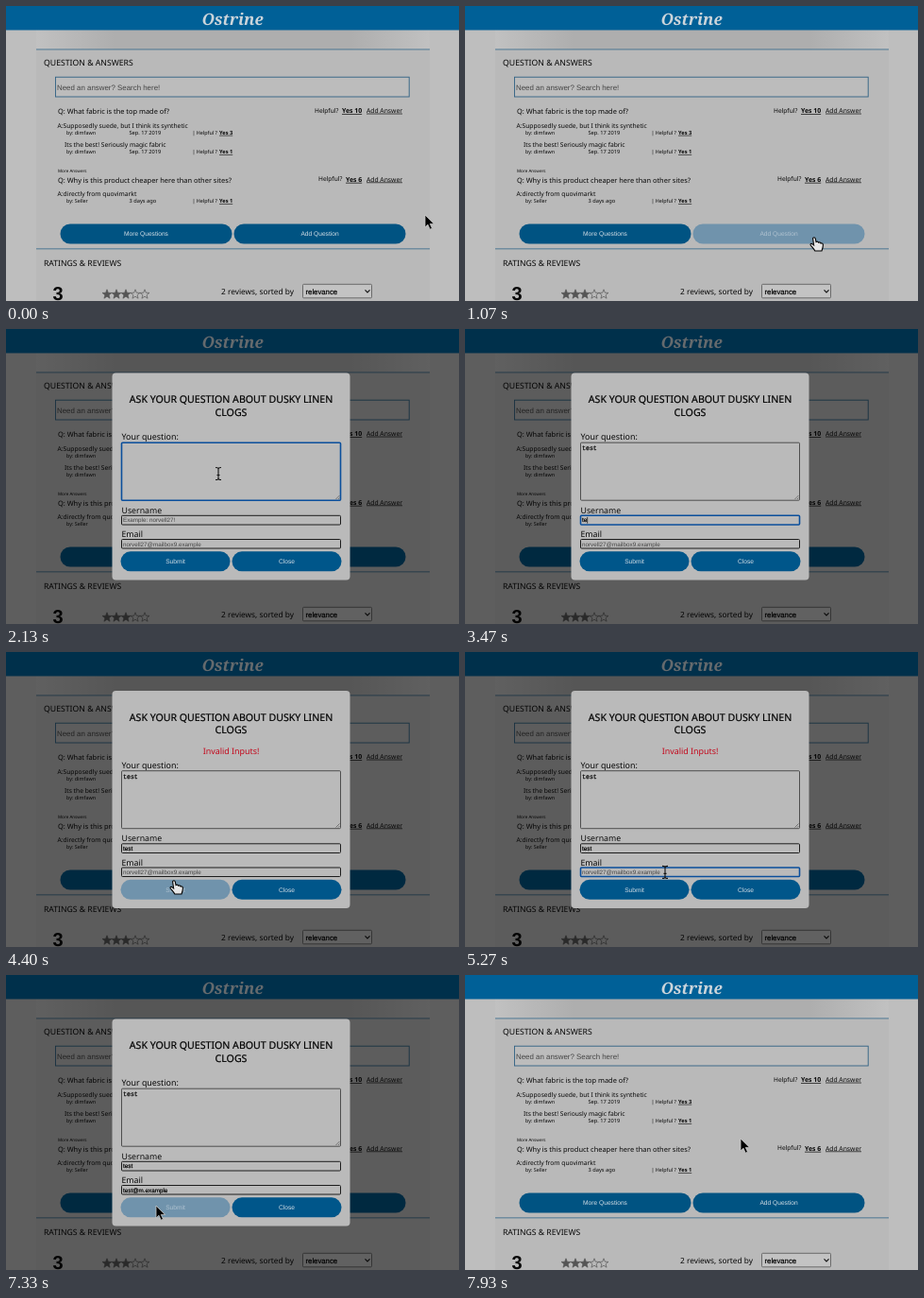
An HTML page for the animation above (8 s loop, 480 by 312 pixels).

```html
<!DOCTYPE html>
<html lang="en">
<head>
<meta charset="utf-8">
<title>Ask a question</title>
<style>
  html, body { margin: 0; width: 100%; height: 100%; overflow: hidden; background: #bebebe; }
  svg { display: block; width: 100vw; height: 100vh; }
  text { font-family: "Noto Sans", "Open Sans", sans-serif; text-rendering: geometricPrecision; fill: #080808; white-space: pre; }
  .ui { font-family: "Liberation Sans", Arial, sans-serif; }
  .mono { font-family: "Liberation Mono", monospace; }
  .logo { font: italic bold 17px "Noto Serif", serif; fill: #ccd5db; }
  .mid { text-anchor: middle; }
  .link { text-decoration: underline; }
  .yes { text-decoration: underline; font-weight: 600; }
  .dark { fill: #000; stroke: #000; stroke-width: .2; }
  .hint { fill: #444; stroke: none; }
  .error { fill: #c4061a; }
  .button rect { fill: #005382; }
  .button text { fill: #d2dde5; }
  #modal .button rect { fill: #00568a; }
  .button.hover rect { fill: #7093ac !important; }
  .button.hover text { fill: #afc2d0; }
  .field { fill: #bababa; stroke: #1c1c1c; }
  #questionBox { stroke: #333; stroke-width: .8; }
  .field.focus, #questionBox.focus { stroke: #0b4f9c; stroke-width: 1.6; }
</style>
</head>
<body>
<svg id="stage" viewBox="0 0 480 312" preserveAspectRatio="none"></svg>
<script>
const text = (x, y, size, str, cls = '', id = '') =>
  `<text x="${x}" y="${y}" font-size="${size}" class="${cls}" id="${id}">${str}</text>`;
const rect = (x, y, w, h, attrs) =>
  `<rect x="${x}" y="${y}" width="${w}" height="${h}" ${attrs}/>`;
const button = (id, x, y, w, label) =>
  `<g class="button" id="${id}">${rect(x, y, w, 21, 'rx="10.5"')}${text(x + w / 2, y + 12.8, 6.65, label, 'ui mid')}</g>`;
const field = (id, y, h) => rect(122.5, y, 232, h, `id="${id}" class="field" rx="1"`);

const question = (y, x, str, votes) =>
  text(55, y, 7.42, str) + text(x, y - 1.4, 6.6, 'Helpful?') +
  text(x + 29, y - 1, 6.9, `Yes ${votes}`, 'yes') + text(382, y - 1.3, 6.75, 'Add Answer', 'link');
const answer = (x, y, str, author, date, votes) =>
  text(x, y, 6.7, str) + text(64, y + 6.9, 5.4, `by: ${author}`) + text(130.5, y + 6.9, 5.7, date) +
  text(197.5, y + 7, 5.4, '| Helpful ?') + text(226, y + 7, 5.7, `Yes ${votes}`, 'yes');

const star = (cx, cy, filled) => {
  const points = Array.from({ length: 10 }, (_, i) => {
    const r = i % 2 ? 2.2 : 5.2, a = i * Math.PI / 5;
    return [cx + r * Math.sin(a), cy - r * Math.cos(a)].map(v => v.toFixed(2));
  });
  return `<polygon points="${points.join(' ')}" fill="${filled ? '#555' : 'none'}" stroke="#555" stroke-width=".7"/>`;
};

const page = `
  <linearGradient id="strip"><stop stop-color="#c1c1c1"/><stop offset=".2" stop-color="#aeaeae"/>
    <stop offset=".8" stop-color="#aeaeae"/><stop offset="1" stop-color="#c1c1c1"/></linearGradient>
  ${rect(0, 0, 480, 312, 'fill="#bebebe"')}
  ${rect(32, 25, 417, 287, 'fill="#b9b9b9"')}
  ${rect(32, 25, 417, 21, 'fill="url(#strip)"')}
  ${rect(32, 45.5, 417, .9, 'fill="#41708f"')}
  ${rect(32, 256.4, 417, .9, 'fill="#41708f"')}
  ${rect(0, 0, 480, 25.5, 'fill="#006097"')}
  ${text(240, 19.5, 17, 'Ostrine', 'logo mid')}
  ${text(40, 63.3, 8.7, 'QUESTION &amp; ANSWERS')}
  ${rect(52.5, 75.2, 374.7, 20.8, 'fill="#bcbcbc" stroke="#2f6183" stroke-width=".9"')}
  ${text(54, 88.5, 7.9, 'Need an answer? Search here!', 'ui hint')}
  ${question(114, 327, 'Q: What fabric is the top made of?', 10)}
  ${answer(54.5, 128.8, 'A:Supposedly suede, but I think its synthetic', 'dimfawn', 'Sep. 17 2019', 3)}
  ${answer(62, 149.3, 'Its the best! Seriously magic fabric', 'dimfawn', 'Sep. 17 2019', 1)}
  ${text(55, 175.8, 4.55, 'More Answers')}
  ${question(186.8, 331, 'Q: Why is this product cheaper here than other sites?', 6)}
  ${answer(54.5, 201.2, 'A:directly from quovimarkt', 'Seller', '3 days ago', 1)}
  ${button('more', 57.5, 230.5, 182, 'More Questions')}
  ${button('add', 241.5, 230.5, 182, 'Add Question')}
  ${text(40, 275, 8.65, 'RATINGS &amp; REVIEWS')}
  <g font-weight="bold">${text(49.5, 311, 20, '3', 'ui')}</g>
  ${[0, 1, 2, 3, 4].map(i => star(107 + i * 10, 305, i < 3)).join('')}
  ${text(228, 305, 8.3, '2 reviews, sorted by')}
  ${rect(314.5, 294.3, 73, 14.5, 'rx="1" fill="#c3c3c3" stroke="#555" stroke-width=".8"')}
  ${text(317.5, 304.5, 7.75, 'relevance', 'ui dark')}
  <path d="M380.5 300.3l2.5 2.5 2.5-2.5" fill="none" stroke="#111" stroke-width="1.2"/>`;

const modal = `<g id="modal">
  ${rect(0, 0, 480, 312, 'fill="#000" opacity=".5"')}
  <rect id="card" x="112.5" width="252" rx="4" fill="#bababa"/>
  <g id="upper">
    ${text(238.5, 78, 10.6, 'ASK YOUR QUESTION ABOUT DUSKY LINEN', 'mid dark')}
    ${text(238.5, 91.5, 10.6, 'CLOGS', 'mid dark')}
  </g>
  ${text(238.5, 107.8, 8.9, 'Invalid Inputs!', 'error mid', 'error')}
  <g id="lower">
    ${text(122.5, 117, 8.9, 'Your question:')}
    ${field('questionBox', 120.2, 61)}
    <path d="M349.5 180l4-4M352 180l1.5-1.5" stroke="#444" stroke-width=".6"/>
    ${text(124, 128.1, 6.6, '', 'mono dark', 'question')}
    ${text(122.5, 194.5, 8.75, 'Username')}
    ${field('userBox', 197.3, 9.7)}
    ${text(124, 204.4, 6.3, '', 'ui dark', 'user')}
    ${text(122.5, 220, 8.75, 'Email')}
    ${field('emailBox', 222.5, 9.5)}
    ${text(124, 229.5, 6.3, '', 'ui dark', 'email')}
    <path id="caret" stroke="#000" stroke-width=".7"/>
    ${button('submit', 121.5, 235.3, 116, 'Submit')}
    ${button('close', 239.5, 235.3, 116, 'Close')}
  </g></g>`;

// Pointer shapes, drawn with the hot spot at 0,0.
const pointers = `<g id="pointer">
  <path id="arrow" d="M0 0V13l3-2.8 2.2 5 2.3-1-2.2-4.8H9.6z" fill="#000" stroke="#ccc" stroke-width=".8"/>
  <path id="hand" d="M-1.4 1C-1.4-.6 1-.6 1.3 1L2 4.6C3 3.8 4.3 4.2 4.6 5.2 5.7 4.5 6.8 5 7 6 8.3 5.5 9.4 6.2 9.4 7.6
    9.5 10 9 11.5 8 14H.8C-.5 11.6-2.4 9.8-3.8 8-4.5 6.8-3 5.8-1.8 6.8L-.4 8z" fill="#e6e6e6" stroke="#000" stroke-width="1.1"/>
  <path id="beam" d="M-3-6.5Q0-6.5 0-5Q0-6.5 3-6.5M0-5V5M-3 6.5Q0 6.5 0 5Q0 6.5 3 6.5M-1.5 1.5h3" fill="none" stroke="#111" stroke-width="1.1"/>
</g>`;

document.getElementById('stage').innerHTML = page + modal + pointers;
const $ = id => document.getElementById(id);

const LOOP = 8000;
const path = [
  [70, 444, 221], [730, 370, 245], [1130, 370, 245], [1730, 225, 153], [2750, 225, 153],
  [3150, 205, 202], [3660, 205, 202], [4000, 178, 242], [4450, 178, 242], [5130, 212, 233],
  [6800, 212, 228], [7300, 159, 244], [7640, 159, 244], [7930, 292, 173],
];
const shapes = [
  [0, 'arrow'], [430, 'hand'], [1130, 'arrow'], [1500, 'beam'], [2470, ''], [2750, 'beam'],
  [3400, ''], [3660, 'arrow'], [4000, 'hand'], [4700, 'beam'], [5800, ''], [6800, 'arrow'],
  [7530, 'hand'], [7700, 'arrow'],
];
const focuses = [[0, ''], [2130, 'questionBox'], [3200, 'userBox'], [4130, ''], [5200, 'emailBox'], [7330, '']];

const within = (t, from, to) => t >= from && t < to;
const latest = (list, t) => list.filter(([start]) => start <= t).pop()[1];
const typed = (str, t, start, step) =>
  t < start ? '' : str.slice(0, 1 + Math.floor((t - start) / step));

function position(t) {
  const next = path.findIndex(([time]) => time > t);
  if (next < 1) return (next ? path[path.length - 1] : path[0]).slice(1);
  const [t0, x0, y0] = path[next - 1], [t1, x1, y1] = path[next];
  const u = (t - t0) / (t1 - t0), k = u * u * (3 - 2 * u);
  return [x0 + (x1 - x0) * k, y0 + (y1 - y0) * k];
}

const show = (id, on) => $(id).style.display = on ? '' : 'none';
const hover = (id, on) => $(id).classList.toggle('hover', on);
const shift = (id, y) => $(id).setAttribute('transform', `translate(0 ${y})`);

function fill(id, value, hint) {
  $(id).textContent = value || hint;
  $(id).classList.toggle('hint', !value);
}

function draw(t) {
  const failed = within(t, 4130, 5800), grow = failed ? 5.5 : 0;
  show('modal', within(t, 1130, 7470));
  show('error', failed);
  $('card').setAttribute('y', 46.5 - grow);
  $('card').setAttribute('height', 219 + 2 * grow);
  shift('upper', -grow);
  shift('lower', grow);

  fill('question', typed('test', t, 2470, 65), '');
  fill('user', typed('test', t, 3400, 65), 'Example: norvell27!');
  fill('email', typed('test@m.example', t, 5800, 32), 'norvell27@mailbox9.example');

  const focus = latest(focuses, t);
  for (const id of ['questionBox', 'userBox', 'emailBox']) $(id).classList.toggle('focus', id === focus);
  const typing = [['question', 2470, 2730], ['user', 3400, 3660], ['email', 5800, 6530]]
    .find(([, from, to]) => within(t, from, to));
  show('caret', typing);
  if (typing) {
    const line = $(typing[0]);
    const x = 124.4 + line.getComputedTextLength(), y = +line.getAttribute('y');
    $('caret').setAttribute('d', `M${x} ${y - 5.5}V${y + 1.2}`);
  }

  hover('add', within(t, 430, 1130));
  hover('submit', within(t, 3950, 4560) || within(t, 7150, 7470));
  hover('more', within(t, 7470, 7700));

  const shape = latest(shapes, t);
  for (const id of ['arrow', 'hand', 'beam']) show(id, id === shape);
  $('pointer').setAttribute('transform', `translate(${position(t)})`);
}

const start = performance.now();
function tick() {
  draw((performance.now() - start) % LOOP);
  requestAnimationFrame(tick);
}
tick();
</script>
</body>
</html>
```
